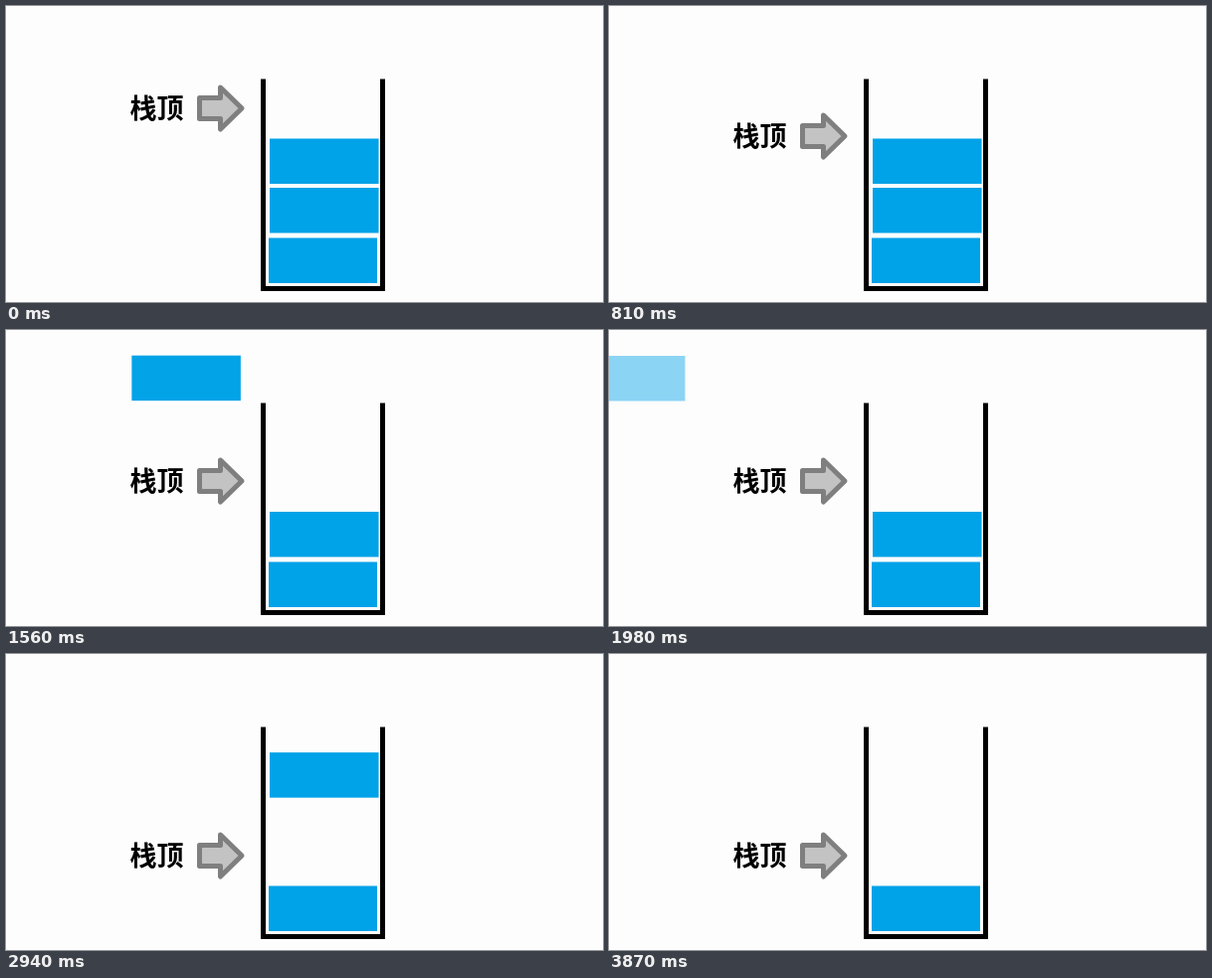
Recreate the animation shown at these times as an HTML page. Size 600 by 298 pixels, loop 4650 ms.

```html
<!DOCTYPE html>
<html lang="zh-CN">
<head>
<meta charset="utf-8">
<title>出栈</title>
<style>
html, body { margin: 0; width: 100%; height: 100%; overflow: hidden; background: #fdfdfd; }
svg { display: block; width: 600px; height: 298px; }
.block { fill: #00a2e8; }
.wall { fill: none; stroke: #000; stroke-width: 5; }
.arrow { fill: #c3c3c3; stroke: #7f7f7f; stroke-width: 5; stroke-linejoin: round; }
text { font: bold 27px "Noto Sans CJK SC", "Noto Sans CJK", sans-serif; }
</style>
</head>
<body>
<svg viewBox="0 0 600 298">
  <rect class="block" x="264" y="233.5" width="109" height="45.5"/>
  <path class="wall" d="M258.5 73.5V284.5H378.5V73.5"/>
  <g id="top">
    <text x="124.5" y="113">栈顶</text>
    <path class="arrow" d="M194.5 92.5H215.5V82L237 103L215.5 124V113.5H194.5Z"/>
  </g>
  <rect class="block" id="mid" width="109.5" height="45.5"/>
  <rect class="block" id="high" width="109.5" height="45.5"/>
</svg>
<script>
const LOOP = 4650, STEP = 30, X = 265, PEAK = -2;
const $ = id => document.getElementById(id);
const clamp = v => Math.min(1, Math.max(0, v));
const ease = u => u < .5 ? 2 * u * u : 1 - 2 * (1 - u) ** 2;
const run = (t, start, span) => ease(clamp((t - start) / span));

// begin/end: whole pop; start/span: travel; rest: height of the sideways leg
const pops = [
  { el: $('high'), y: 133.5, rest: 26, left: 310, begin: 390, end: 2130, start: 829, span: 1302 },
  { el: $('mid'), y: 183, rest: 16, left: 322, begin: 2130, end: 3870, start: 2567, span: 1297 }
];

function place(p, t) {
  const rise = p.y - PEAK;
  const s = run(t, p.start, p.span) * (rise + p.left);
  const side = Math.max(0, s - rise);
  const y = side ? PEAK + (p.rest - PEAK) * ease(clamp(side / 150)) : p.y - s;
  const fade = clamp((t - p.begin - 1098) / 662);
  p.el.setAttribute('x', X - side);
  p.el.setAttribute('y', y);
  p.el.setAttribute('opacity', t < p.end ? 1 - fade * fade : 0);
}

function draw(now) {
  const t = Math.floor(now % LOOP / STEP) * STEP;
  const drop = 49 * run(t, 390, 782) + 51 * run(t, 2130, 782);
  $('top').setAttribute('transform', `translate(0 ${drop})`);
  pops.forEach(p => place(p, t));
}

const t0 = performance.now();
function tick() {
  draw(performance.now() - t0);
  requestAnimationFrame(tick);
}
tick();
</script>
</body>
</html>
```
